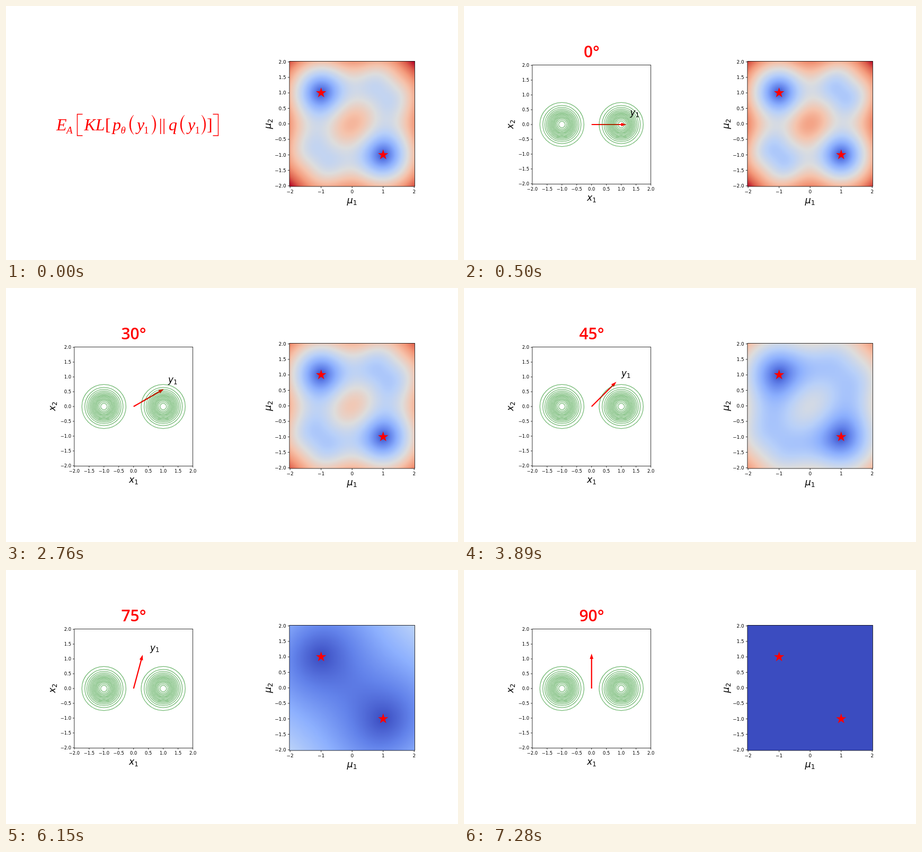
An HTML page with a canvas that plays this animation: 853 by 480 pixels, repeating every 8000 ms.

```html
<!DOCTYPE html>
<html lang="en">
<head>
<meta charset="utf-8">
<title>KL divergence under projection</title>
<style>
  html, body { margin: 0; width: 100%; height: 100%; overflow: hidden; background: #fff; }
  #stage { position: absolute; left: 0; top: 0; width: 853px; height: 480px; }
  #heat { position: absolute; left: 534.9px; top: 104.45px; width: 236.6px; height: 236.6px; }
  svg { position: absolute; left: 0; top: 0; }
  .plot text { font-family: "DejaVu Sans", sans-serif; }
  .math text { font-family: "Liberation Serif", serif; font-size: 32px; fill: #f00; }
  .it { font-style: italic; }
  #angle { font: 600 30px "Open Sans", sans-serif; fill: #f00; text-anchor: middle; }
</style>
</head>
<body>
<div id="stage">
  <canvas id="heat" width="101" height="101"></canvas>
  <svg width="853" height="480" viewBox="0 0 853 480">
    <g id="formula" class="math"></g>
    <g id="left" class="plot"></g>
    <g id="right" class="plot"></g>
  </svg>
</div>
<script>
const LOOP = 8000, FIRST = 500, STEP = 1130;
const N = 101, VAR = 0.1, VMAX = 5.9;
const $ = id => document.getElementById(id);

function add(parent, tag, attrs, text) {
  const el = document.createElementNS('http://www.w3.org/2000/svg', tag);
  for (const k in attrs) el.setAttribute(k, attrs[k]);
  if (text !== undefined) el.textContent = text;
  parent.appendChild(el);
  return el;
}

// ---------- divergence maps ----------

// Mean log density of a mixture at +-c under N(a, VAR), up to a constant.
function meanLog(a, c) {
  let sum = 0, weight = 0;
  for (let z = -5; z <= 5; z += 0.1) {
    const w = Math.exp(-z * z / 2);
    const y = Math.abs(a + z * Math.sqrt(VAR));
    sum += w * (Math.log1p(Math.exp(-2 * y * c / VAR)) - (y - c) ** 2 / (2 * VAR));
    weight += w;
  }
  return sum / weight;
}

function klMap(deg) {
  const m = Math.cos(deg * Math.PI / 180);
  const own = [], cross = [], map = new Float64Array(N * N);
  for (let i = 0; i < N; i++) {
    own.push(meanLog(m * i * 0.02, m * i * 0.02));
    cross.push(meanLog(m * (i * 0.04 - 2), m));
  }
  for (let r = 0; r < N; r++)
    for (let c = 0; c < N; c++) {
      const j = N - 1 - r;
      map[r * N + c] = Math.max(0, own[Math.abs(c - j)] - (cross[c] + cross[j]) / 2);
    }
  return map;
}

function meanMap(count) {
  const sum = new Float64Array(N * N);
  for (let k = 0; k < count; k++)
    klMap((k + 0.5) * 90 / count).forEach((v, i) => sum[i] += v);
  return sum;
}

const RAMP = [
  [59, 76, 192], [98, 130, 234], [141, 176, 254], [184, 208, 249], [221, 221, 221],
  [245, 196, 173], [244, 154, 123], [222, 96, 77], [180, 4, 38]
];

function paint(map, max) {
  const img = new ImageData(N, N);
  map.forEach((v, i) => {
    const p = Math.min(1, Math.sqrt(v / max)) * 8;
    const k = Math.min(7, Math.floor(p));
    for (let ch = 0; ch < 3; ch++)
      img.data[i * 4 + ch] = RAMP[k][ch] + (RAMP[k + 1][ch] - RAMP[k][ch]) * (p - k);
    img.data[i * 4 + 3] = 255;
  });
  return img;
}

const mean = meanMap(24);
const images = [paint(mean, Math.max(...mean))];
for (let deg = 0; deg <= 90; deg += 15) images.push(paint(klMap(deg), VMAX));

// ---------- plots ----------

function axes(g, { cx, cy, unit, w, h, size, xStep, digits }) {
  const line = { stroke: '#000', 'stroke-width': 0.8, fill: 'none' };
  const text = (x, y, anchor, v, n) =>
    add(g, 'text', { x, y, 'text-anchor': anchor, 'font-size': size },
      v.toFixed(n).replace('-', '\u2212'));
  add(g, 'rect', { x: cx - w, y: cy - h, width: 2 * w, height: 2 * h, ...line });
  for (let v = -2; v <= 2; v += xStep) {
    const x = cx + v * unit;
    add(g, 'path', { d: `M${x} ${cy + h}v${size * 0.35}`, ...line });
    text(x, cy + h + size * 1.48, 'middle', v, digits);
  }
  for (let v = -2; v <= 2; v += 0.5) {
    const y = cy - v * unit;
    add(g, 'path', { d: `M${cx - w} ${y}h${-size * 0.35}`, ...line });
    text(cx - w - size * 0.7, y + size * 0.365, 'end', v, 1);
  }
}

function symbol(g, name, sub, size, transform, anchor) {
  const t = add(g, 'text', { 'font-size': size, 'text-anchor': anchor, transform });
  add(t, 'tspan', { class: 'it' }, name);
  add(t, 'tspan', { 'font-size': size * 0.7, dy: size * 0.17 }, sub);
  return t;
}

const L = { cx: 240.75, cy: 224, unit: 55.95, w: 111.9, h: 112.4, size: 8.4, xStep: 0.5, digits: 1 };
const R = { cx: 653.2, cy: 222.75, unit: 58.55, w: 118.3, h: 118.3, size: 8.87, xStep: 1, digits: 0 };

const left = $('left');
const u = L.unit;
const arrow = add(left, 'path', {
  d: `M0 ${-0.02 * u}H${u}V${-0.06 * u}L${1.18 * u} 0L${u} ${0.06 * u}V${0.02 * u}H0Z`, fill: '#f00'
});
const peak = 0.5 / (2 * Math.PI * VAR);
for (const side of [-1, 1])
  for (let k = 1; k <= 15; k++)
    add(left, 'circle', {
      cx: L.cx + side * u, cy: L.cy, r: u * Math.sqrt(2 * VAR * Math.log(peak / (k * 0.05))),
      fill: 'none', stroke: '#008000', 'stroke-opacity': 0.55, 'stroke-width': 1.26
    });
axes(left, L);
symbol(left, 'x', '1', 16.8, 'translate(241 368.3)', 'middle');
symbol(left, 'x', '2', 16.8, 'translate(93 223.5) rotate(-90)', 'middle');
const tag = symbol(left, 'y', '1', 16.8, '', 'start');
const angle = add(left, 'text', { id: 'angle', x: 241, y: 97.3 });

const right = $('right');
axes(right, R);
symbol(right, 'μ', '1', 17.7, 'translate(653 373.3)', 'middle');
symbol(right, 'μ', '2', 17.7, 'translate(499.7 222.75) rotate(-90)', 'middle');
for (const side of [-1, 1]) {
  const pts = [];
  for (let k = 0; k < 10; k++) {
    const r = k % 2 ? 3.9 : 10.2, a = k * Math.PI / 5;
    pts.push([R.cx + side * R.unit + r * Math.sin(a), R.cy + side * R.unit - r * Math.cos(a)]);
  }
  add(right, 'polygon', { points: pts.join(' '), fill: '#f00' });
}

// ---------- formula ----------

const formula = $('formula');
const main = (x, s, cls = 'it') => add(formula, 'text', { x, y: 235, class: cls }, s);
const sub = (x, s, cls = 'it') =>
  add(formula, 'text', { x, y: 241.3, class: cls, style: 'font-size:19px' }, s);
const paren = (x, dir) => add(formula, 'path', {
  d: 'M8 0C-2.5 9-2.5 28 8 37C.5 28 .5 9 8 0Z', fill: '#f00', stroke: '#f00', 'stroke-width': 0.4,
  transform: `translate(${x} 206) scale(${dir} 1)`
});
const bracket = (x, dir) => add(formula, 'path', {
  d: `M${x + dir * 10} 204.5H${x}V245H${x + dir * 10}`, fill: 'none', stroke: '#f00', 'stroke-width': 1.4
});

main(95, 'E'); sub(114, 'A');
bracket(134.5, 1);
main(147.5, 'KL'); main(187, '[', '');
main(201, 'p'); sub(216.5, 'θ');
paren(233, 1); main(247, 'y'); sub(260, '1', ''); paren(283, -1);
main(288.5, '||', '');
main(307, 'q');
paren(329, 1); main(343, 'y'); sub(356.5, '1', ''); paren(377, -1);
main(379, ']', '');
bracket(400.5, -1);

// ---------- playback ----------

const ctx = $('heat').getContext('2d');
let shown = -1;

function show(step) {
  if (step === shown) return;
  shown = step;
  ctx.putImageData(images[step], 0, 0);
  formula.style.display = step ? 'none' : '';
  left.style.display = step ? '' : 'none';
  if (!step) return;
  const deg = (step - 1) * 15, a = deg * Math.PI / 180;
  angle.textContent = deg + '°';
  arrow.setAttribute('transform', `translate(${L.cx} ${L.cy}) rotate(${-deg})`);
  tag.setAttribute('transform',
    `translate(${L.cx + u * (Math.cos(a) + 0.3)} ${L.cy - u * (Math.sin(a) + 0.31)})`);
  tag.style.display = deg < 90 ? '' : 'none';
}

const start = performance.now();
function tick() {
  const t = (performance.now() - start) % LOOP;
  show(t < FIRST ? 0 : 1 + Math.floor((t - FIRST) / STEP));
  requestAnimationFrame(tick);
}
tick();
</script>
</body>
</html>
```
